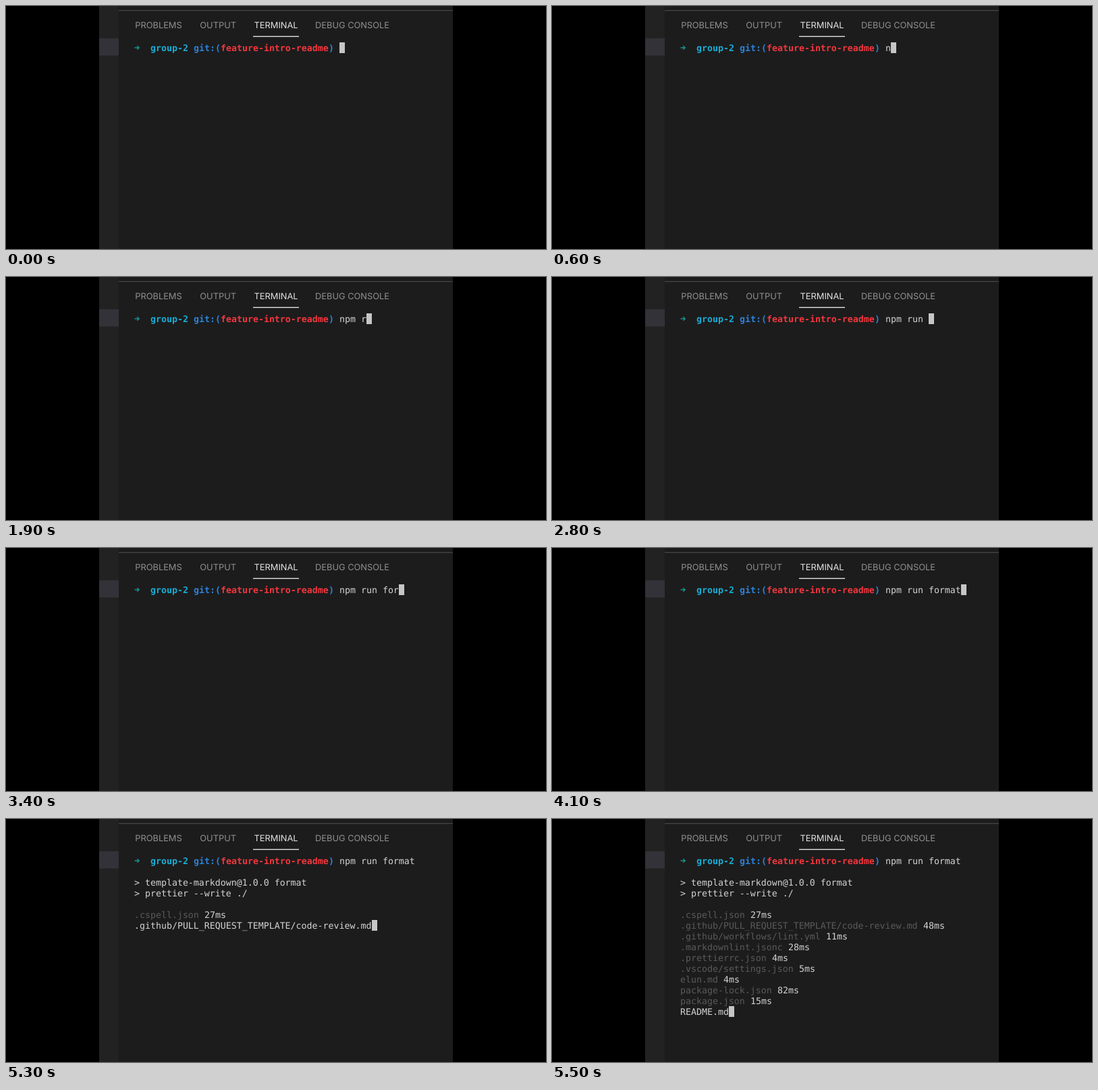
An HTML page that plays this animation: 800x361 px, repeating every 5600 ms.

```html
<!DOCTYPE html>
<html lang="en">
<head>
<meta charset="utf-8">
<title>Terminal: npm run format</title>
<style>
  html, body { margin: 0; width: 100%; height: 100%; overflow: hidden; background: #000; }
  svg { display: block; width: 100vw; height: 100vh; }
  text { white-space: pre; text-rendering: geometricPrecision; }
  .tabs { font: 12.85px Inter, sans-serif; fill: #909090; }
  .tabs .active { fill: #e4e4e4; }
  #screen { font: 13.288px "DejaVu Sans Mono", monospace; fill: #d4d4d4; }
  .bold { font-weight: 700; }
  .cyan { fill: #18aed6; }
  .blue { fill: #2c82da; }
  .red { fill: #f4363e; }
  .dim { fill: #5a5a5a; }
</style>
</head>
<body>
<svg viewBox="0 0 800 361">
  <rect width="800" height="361" fill="#000"/>
  <rect x="138" width="29" height="361" fill="#222"/>
  <rect x="138" y="48" width="29" height="25.5" fill="#323238"/>
  <rect x="167" width="495" height="361" fill="#1c1c1c"/>
  <rect x="167" y="6" width="495" height="1.3" fill="#444"/>
  <g class="tabs">
    <text x="191.2" y="32.5">PROBLEMS</text>
    <text x="287.3" y="32.5">OUTPUT</text>
    <text x="367.5" y="32.5" class="active">TERMINAL</text>
    <text x="458" y="32.5">DEBUG CONSOLE</text>
  </g>
  <rect x="366" y="44.6" width="68" height="1.4" fill="#dedede"/>
  <path d="M190.5 62H196M194.2 59.2L197.3 62L194.2 64.8" fill="none" stroke="#149490" stroke-width="1.4"/>
  <g id="screen"></g>
  <rect id="cursor" width="8" height="16" fill="#c6c6c6"/>
</svg>
<script>
const LOOP = 5600, STEP = 100;
const LEFT = 190, TOP = 54, CELL = 8, LINE = 16, BASELINE = 12.5;
const PROMPT_END = 38;
const COMMAND = 'npm run format';
const KEY_TIMES = [500, 800, 1000, 1500, 1900, 2200, 2500, 2700, 3000, 3200, 3400, 3600, 3800, 4000];
const ENTER = 4600, HEADER = 5100, FILES_START = 5270, FIRST_FILE_ROW = 5;
const FILES = [
  ['.cspell.json', 27],
  ['.github/PULL_REQUEST_TEMPLATE/code-review.md', 48],
  ['.github/workflows/lint.yml', 11],
  ['.markdownlint.jsonc', 28],
  ['.prettierrc.json', 4],
  ['.vscode/settings.json', 5],
  ['elun.md', 4],
  ['package-lock.json', 82],
  ['package.json', 15],
  ['README.md', Infinity]
];

const screen = document.getElementById('screen');
const cursor = document.getElementById('cursor');

function print(row, col, content, style = '') {
  const node = document.createElementNS('http://www.w3.org/2000/svg', 'text');
  node.setAttribute('x', LEFT + col * CELL);
  node.setAttribute('y', TOP + row * LINE + BASELINE);
  node.setAttribute('class', style);
  node.textContent = content;
  return screen.appendChild(node);
}

function show(node, visible) {
  node.style.display = visible ? '' : 'none';
}

print(0, 3, 'group-2', 'bold cyan');
print(0, 11, 'git:(', 'bold blue');
print(0, 16, 'feature-intro-readme', 'bold red');
print(0, 36, ')', 'bold blue');

const command = print(0, PROMPT_END, '');
const header = [
  print(2, 0, '> template-markdown@1.0.0 format'),
  print(3, 0, '> prettier --write ./')
];

let clock = FILES_START;
const files = FILES.map(([name, duration], i) => {
  const row = FIRST_FILE_ROW + i;
  const start = clock;
  clock += duration;
  return {
    row, start, end: clock, length: name.length,
    name: print(row, 0, name),
    time: print(row, name.length + 1, duration + 'ms')
  };
});

function render(t) {
  const typed = KEY_TIMES.filter(key => key <= t).length;
  command.textContent = COMMAND.slice(0, typed);
  let row = 0, col = PROMPT_END + typed;
  if (t >= ENTER) [row, col] = [1, 0];
  if (t >= HEADER) [row, col] = [FIRST_FILE_ROW, 0];
  header.forEach(line => show(line, t >= HEADER));

  // A file name stays bright while it is being formatted, then dims.
  for (const file of files) {
    const done = t >= file.end;
    show(file.name, t >= file.start);
    show(file.time, done);
    file.name.setAttribute('class', done ? 'dim' : '');
    if (t >= file.start) [row, col] = [file.row, file.length];
  }
  cursor.setAttribute('x', LEFT + col * CELL);
  cursor.setAttribute('y', TOP + row * LINE);
}

function tick() {
  render(Math.floor(performance.now() % LOOP / STEP) * STEP);
  requestAnimationFrame(tick);
}
tick();
</script>
</body>
</html>
```
